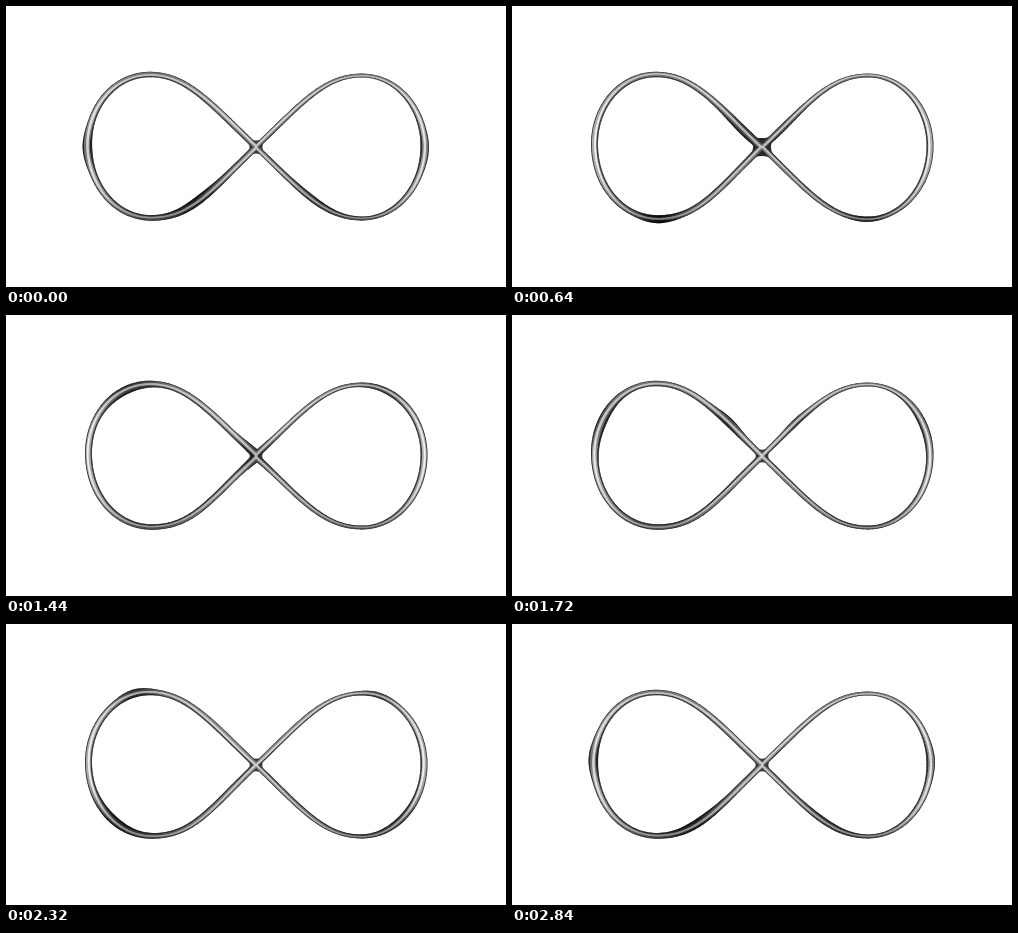
Recreate the animation shown at these times as an HTML page with a canvas. Size 500 by 281 pixels, loop 2880 ms.

```html
<!DOCTYPE html>
<html lang="en">
<head>
<meta charset="utf-8">
<title>Metal infinity loop</title>
<style>
  html, body { margin: 0; width: 100%; height: 100%; overflow: hidden; background: #fff; }
  canvas { display: block; }
</style>
</head>
<body>
<canvas id="stage" width="500" height="281"></canvas>
<script>
const ctx = document.getElementById('stage').getContext('2d');
const LOOP = 2880, STEP = 40, SAMPLES = 320;
const CENTER = { x: 250, y: 141 };

// Each lobe runs from the crossing over its top, round the side and back.
const LOBES = [
  { d: 'M250 141C205 98 181 68.5 144 68.5C109 68.5 82.5 100 82.5 138C82.5 180 110 212 146 212C187 212 205 184 250 141', side: 1 },
  { d: 'M250 141C295 98 318 69.5 356 69.5C391 69.5 418 102 418 140C418 180 390 212.5 356 212.5C317 212.5 295 184 250 141', side: -1 }
];

function sampleLobe({ d, side }) {
  const path = document.createElementNS('http://www.w3.org/2000/svg', 'path');
  path.setAttribute('d', d);
  const length = path.getTotalLength();
  return Array.from({ length: SAMPLES }, (_, i) => {
    const u = (i + 0.5) / SAMPLES;
    const p = path.getPointAtLength(u * length);
    const a = path.getPointAtLength(u * length - 1);
    const b = path.getPointAtLength(u * length + 1);
    const size = Math.hypot(b.x - a.x, b.y - a.y);
    const tx = (b.x - a.x) / size, ty = (b.y - a.y) / size;
    return { u, side, x: p.x, y: p.y, tx, ty, nx: -ty * side, ny: tx * side };
  });
}
const points = LOBES.flatMap(sampleLobe);

function bump(u, center, width) {
  const d = u - center;
  return Math.exp(-(((d - Math.round(d)) / width) ** 2));
}

const gray = v => {
  const c = Math.round(Math.max(0, Math.min(255, v)));
  return `rgb(${c},${c},${c})`;
};

const widePhase = phase => phase - 0.17;
const tightPhase = phase => phase + 0.505;

// Cross-section of the tube at one sample; positive offsets point outward.
function profile(p, phase) {
  const strength = p.side > 0 ? 1 : 0.6;
  const wide = strength * bump(p.u, widePhase(phase), 0.065);
  const tight = strength * bump(p.u, tightPhase(phase), 0.04);
  const upright = p.ty * p.ty;
  const half = 2.3 + 1.15 * upright + p.side * 0.4 * (1 - upright) + 1.3 * wide + 1.3 * tight;
  const offset = 1.2 * tight - 1.2 * wide;
  const lower = Math.max(0, Math.min(1, (p.y - 120) / 60));
  return {
    half,
    offset,
    upright,
    dark: Math.min(1, wide + tight),
    shade: lower * (1 - upright),
    shine: 0.2 * Math.sin(2 * Math.PI * (2 * (p.u - phase) + 0.2)) - offset / half
  };
}

// Paints the strip between two positions across the tube, -1 inside to 1 outside.
function drawBand(profiles, from, to, tone) {
  points.forEach((p, i) => {
    const q = profiles[i];
    const shift = q.offset + q.half * (from(q) + to(q)) / 2;
    const x = p.x + p.nx * shift, y = p.y + p.ny * shift;
    ctx.lineWidth = q.half * (to(q) - from(q));
    ctx.strokeStyle = gray(tone(q));
    ctx.beginPath();
    ctx.moveTo(x - p.tx * 1.2, y - p.ty * 1.2);
    ctx.lineTo(x + p.tx * 1.2, y + p.ty * 1.2);
    ctx.stroke();
  });
}

// A four-pointed web fills the corners where the strands meet.
function drawCrossing(phase) {
  const swell = bump(0, widePhase(phase), 0.1);
  const reach = 9 + 5 * swell, waist = 3.5 + 2 * swell;
  ctx.fillStyle = gray(60 - 25 * swell);
  ctx.beginPath();
  ctx.moveTo(CENTER.x - reach, CENTER.y - reach);
  for (let turn = 0; turn < 4; turn++) {
    const angle = (turn - 1) * Math.PI / 2;
    const cos = Math.cos(angle), sin = Math.sin(angle);
    ctx.quadraticCurveTo(
      CENTER.x + waist * cos, CENTER.y + waist * sin,
      CENTER.x + reach * (cos - sin), CENTER.y + reach * (sin + cos));
  }
  ctx.fill();
}

function draw(time) {
  const phase = Math.floor(time % LOOP / STEP) * STEP / LOOP;
  const profiles = points.map(p => profile(p, phase));
  ctx.fillStyle = '#fff';
  ctx.fillRect(0, 0, 500, 281);
  drawCrossing(phase);
  drawBand(profiles, () => -1, () => 1, q => 62 - 30 * q.dark - 20 * q.shade);
  drawBand(profiles, () => -0.55, () => 0.72,
    q => 120 + 55 * q.upright - 65 * q.dark - 40 * q.shade);
  drawBand(profiles, q => q.shine - 0.22, q => q.shine + 0.28,
    q => 195 + 45 * q.upright - 30 * q.dark - 45 * q.shade);
}

const start = performance.now();
function frame() {
  draw(performance.now() - start);
  requestAnimationFrame(frame);
}
frame();
</script>
</body>
</html>
```
